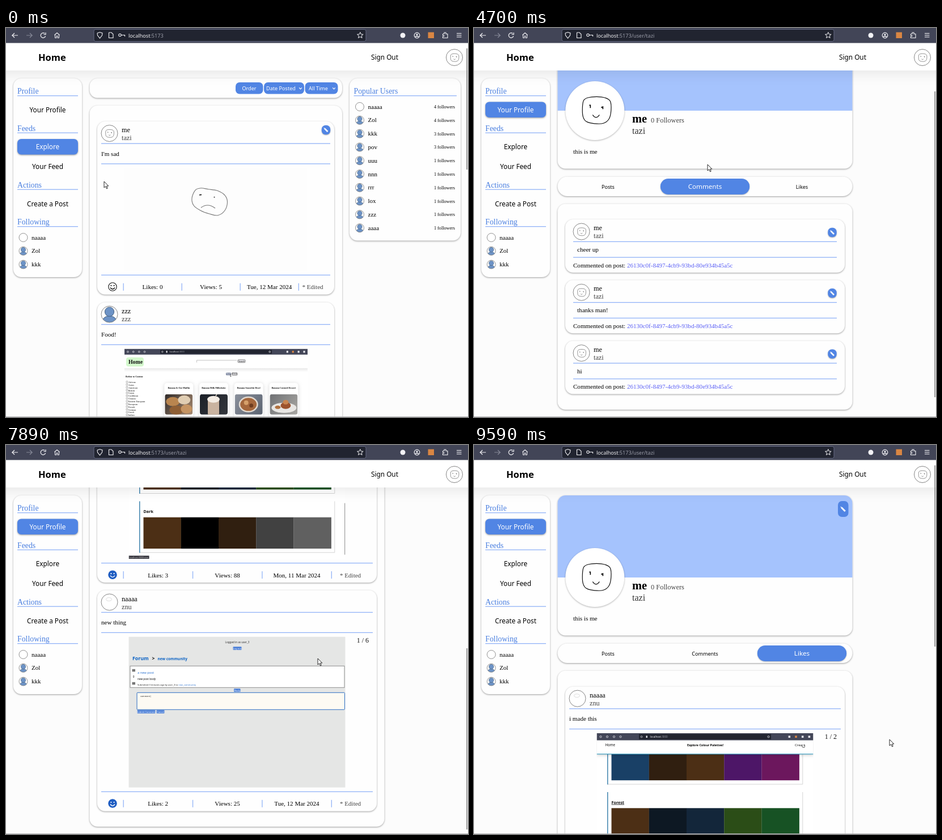
Recreate the animation shown at these times as an HTML page with a canvas. Size 815 px wide and 687 px high, loop 9.66 s.

```html
<!DOCTYPE html>
<html lang="en">
<head>
<meta charset="utf-8">
<title>Social feed walkthrough</title>
<style>
html, body { margin: 0; width: 100%; height: 100%; overflow: hidden; background: #fcfcfc; }
canvas { display: block; }
</style>
</head>
<body>
<canvas id="stage" width="815" height="687"></canvas>
<script>
const c = document.getElementById('stage').getContext('2d');
const LOOP = 9660, W = 815, H = 687;
const BLUE = '#5185e4', RULE = '#92b3f7', PAGE = '#fcfcfc';

// ---- timeline: [time, ...values], eased between stops
const POINTER = [[200, 173, 271], [1130, 97, 145], [2080, 97, 145], [2990, 350, 300], [3500, 412, 241],
  [4700, 412, 241], [5560, 584, 275], [5700, 584, 275], [6630, 551, 354], [7000, 551, 354],
  [7490, 550, 377], [8850, 550, 377], [9590, 733, 520]];
const SCROLL = [[2300, 0], [2900, 120], [4020, 120], [4370, 88], [6660, 88], [6960, 440], [7100, 440],
  [7480, 630], [8200, 630], [8550, 443], [8650, 443], [9130, 0]];
const CLIP_SCROLL = [[7000, 0], [7890, 331.6], [8020, 343.6]];
const CLIP_HAND = [[8600, 491, 185], [9500, 581, 22]];

function at(keys, t) {
  const i = keys.findIndex(k => k[0] > t);
  if (i === 0) return keys[0].slice(1);
  if (i < 0) return keys[keys.length - 1].slice(1);
  const a = keys[i - 1], b = keys[i], u = (t - a[0]) / (b[0] - a[0]), e = u * u * (3 - 2 * u);
  return a.slice(1).map((v, k) => v + (b[k + 1] - v) * e);
}

// ---- drawing helpers
const serif = (px, w = '') => `${w} ${px}px "Liberation Serif", "Times New Roman", serif`;
const sans = (px, w = '') => `${w} ${px}px "Noto Sans", "Open Sans", sans-serif`;

function text(s, x, y, font, color = '#111', align = 'left') {
  c.font = font; c.fillStyle = color; c.textAlign = align;
  c.fillText(s, x, y);
}
function rect(x, y, w, h, color) { c.fillStyle = color; c.fillRect(x, y, w, h); }
function round(x, y, w, h, r, fill, stroke) {
  c.beginPath(); c.roundRect(x, y, w, h, r);
  if (fill) { c.fillStyle = fill; c.fill(); }
  if (stroke) { c.strokeStyle = stroke; c.lineWidth = 1; c.stroke(); }
}
function oval(x, y, rx, ry, fill, stroke, lw = 1) {
  c.beginPath(); c.ellipse(x, y, rx, ry, 0, 0, 7);
  if (fill) { c.fillStyle = fill; c.fill(); }
  if (stroke) { c.strokeStyle = stroke; c.lineWidth = lw; c.stroke(); }
}
const disc = (x, y, r, fill, stroke, lw) => oval(x, y, r, r, fill, stroke, lw);
function line(pts, color, lw = 1, fill) {
  c.beginPath();
  for (let i = 0; i < pts.length; i += 2) c.lineTo(pts[i], pts[i + 1]);
  if (fill) { c.closePath(); c.fillStyle = fill; c.fill(); }
  c.strokeStyle = color; c.lineWidth = lw; c.stroke();
}
function curve(x0, y0, cx, cy, x1, y1, color, lw = 1) {
  c.beginPath(); c.moveTo(x0, y0); c.quadraticCurveTo(cx, cy, x1, y1);
  c.strokeStyle = color; c.lineWidth = lw; c.stroke();
}
function shadow(color, blur, dy, draw) {
  c.save(); c.shadowColor = color; c.shadowBlur = blur; c.shadowOffsetY = dy; draw(); c.restore();
}
function card(x, y, w, h, r = 14, fill = '#fefefe') {
  shadow('rgba(0,0,0,.38)', 3, 1, () => round(x, y, w, h, r, fill));
}
const rule = (x0, x1, y) => rect(x0, y - .6, x1 - x0, 1.3, RULE);
function clip(x, y, w, h, r, draw) {
  c.save(); c.beginPath(); c.roundRect(x, y, w, h, r); c.clip(); draw(); c.restore();
}
// closed smooth curve through every point
function blob(p, color, lw) {
  const n = p.length, v = i => p[(i + n) % n];
  c.beginPath(); c.moveTo(p[0], p[1]);
  for (let i = 0; i < n; i += 2) {
    const x1 = v(i) + (v(i + 2) - v(i - 2)) / 6, y1 = v(i + 1) + (v(i + 3) - v(i - 1)) / 6;
    const x2 = v(i + 2) - (v(i + 4) - v(i)) / 6, y2 = v(i + 3) - (v(i + 5) - v(i + 1)) / 6;
    c.bezierCurveTo(x1, y1, x2, y2, v(i + 2), v(i + 3));
  }
  c.strokeStyle = color; c.lineWidth = lw; c.stroke();
}
function scaled(x, y, k, draw) { c.save(); c.translate(x, y); c.scale(k, k); draw(); c.restore(); }

// ---- faces and avatars
function happy(x, y, k, color, lw) {
  scaled(x, y, k, () => {
    blob([-23, -17, -16, -22, 0, -24, 15, -22, 24, -16, 25.5, 0, 22, 15, 12, 23, -4, 23.5, -18, 20, -24, 11, -25, -4], color, lw);
    line([-13, -9, -11, -9, -11, -4], color, lw * 1.4);
    line([8, -5, 11, -6, 11, -2], color, lw * 1.5);
    curve(-7, 8, -1, 17, 5, 8, color, lw);
  });
}
function sad(x, y, k) {
  scaled(x, y, k, () => {
    const g = '#777';
    blob([-25, -21, -15, -24.5, -2, -22.5, 14, -20, 27, -12, 31.5, 0, 27, 15, 15, 23.5, 0, 21, -16, 15, -28, 6, -31, -7], g, 1.1);
    line([-18, -12.5, -14, -13], '#222', 1.7);
    disc(8.5, -8.5, 1, '#333');
    curve(-15, 10, -3, 1, 10, 11, g, 1.1);
  });
}
function avatar(kind, x, y, r) {
  const big = r > 10;
  disc(x, y, r, 'white');
  if (kind === 'face') happy(x + .5, y + .3, .29 * r / 14.5, '#666', 2.4);
  if (kind === 'user') {
    clip(x - r, y - r, 2 * r, 2 * r, r, () => {
      oval(x, y + r * .95, r * .9, r * .75, '#6d93c6', '#46607f', big ? 1 : .6);
      disc(x, y - r * .3, r * .56, '#6d93c6', '#46607f', big ? 1 : .6);
    });
  }
  if (kind === 'blank' && big) oval(x - 1, y - 5, 5, 3, null, '#dcdcdc');
  disc(x, y, r, null, '#777', big ? .9 : .8);
}
function pencil(x, y) {
  line([x - 2.6, y - 2.6, x + 3, y + 3], 'white', 2.6);
  line([x - 4, y - 4, x - 2, y - 2], 'white', 1);
}
function editDot(x, y) {
  shadow('rgba(0,0,0,.3)', 2, 1, () => round(x - 7.7, y - 8.2, 15.4, 16.4, 7, BLUE));
  pencil(x, y);
}

// ---- browser frame
function browser(url) {
  const ink = '#f2f2f5', dim = '#868998';
  rect(0, 0, W, 26.5, '#424557');
  round(155, 2.5, 480, 21, 3, '#212430', '#646981');
  line([21, 13, 11, 13, 15, 9], ink, 1.2); line([11, 13, 15, 17], ink, 1.2);
  line([36, 13, 46, 13, 42, 9], dim, 1.2); line([46, 13, 42, 17], dim, 1.2);
  c.beginPath(); c.arc(65.5, 13, 4.3, .3, 5.4); c.strokeStyle = ink; c.lineWidth = 1.2; c.stroke();
  line([70, 8, 70, 11.5, 66.5, 11.5], ink, 1.2);
  line([85.5, 12.5, 90, 8.5, 94.5, 12.5], ink, 1.2);
  line([86.5, 12, 86.5, 17.5, 89, 17.5, 89, 14, 91, 14, 91, 17.5, 93.5, 17.5, 93.5, 12], ink, 1);
  line([161, 9, 165.5, 7.5, 170, 9, 169.5, 13, 165.5, 18, 161.5, 13, 161, 9], ink, 1.1);
  line([181.5, 8, 186, 8, 189, 11, 189, 17.5, 181.5, 17.5, 181.5, 8], ink, 1.1);
  disc(201, 12.5, 2.2, null, ink, 1.1);
  line([203, 12.5, 209.5, 12.5, 209.5, 15], ink, 1.2);
  const star = [];
  for (let i = 0; i < 11; i++) {
    const a = -Math.PI / 2 + i * Math.PI / 5, r = i % 2 ? 2.5 : 5.6;
    star.push(624.8 + r * Math.cos(a), 13 + r * Math.sin(a));
  }
  line(star, ink, 1);
  text('localhost', 216, 16.5, sans(9.1), '#f4f4f6');
  text(url, 216 + c.measureText('localhost').width, 16.5, sans(9.1), '#9a9ca8');
  disc(700, 13, 4.5, ink);
  disc(725, 13, 4.8, null, ink, 1.2); disc(725, 11.5, 1.6, ink); curve(722, 15.6, 725, 13, 728, 15.6, ink, 1.6);
  rect(744.5, 7.5, 10.5, 10.5, '#d98643');
  line([770.5, 10.5, 773, 10.5, 773, 8, 776, 8, 776, 10.5, 779, 10.5, 779, 17.5, 770.5, 17.5, 770.5, 15, 773, 14, 770.5, 13, 770.5, 10.5], ink, 1.1);
  for (let i = 0; i < 3; i++) line([795, 9.5 + i * 3.2, 803.5, 9.5 + i * 3.2], ink, 1.1);
}
function header() {
  shadow('rgba(0,0,0,.09)', 24, 5, () => rect(-30, 26, W + 60, 49, 'white'));
  text('Home', 57, 58, sans(16.5, 'bold'), '#000');
  text('Sign Out', 644, 56, sans(11.8), '#000');
  avatar('face', 791, 52, 14.5);
}

// ---- sidebar and popular users
const PEOPLE = ['naaaa', 'Zol', 'kkk', 'pov', 'uuu', 'nnn', 'rrr', 'lox', 'zzz', 'aaaa'];
const COUNTS = [4, 4, 3, 3];
function heading(s, x, x1, y) {
  text(s, x, y, serif(13.8), '#4a7fe0');
  rule(x, x1, y + 3.6);
}
function person(i, x, y, tx) {
  avatar(i ? 'user' : 'blank', x, y, 7.5);
  text(PEOPLE[i], tx, y + 3.5, serif(11), '#000');
}
function sidebar(active, ptr) {
  card(13, 89, 121, 351);
  [['Profile', 116], ['Feeds', 181.5], ['Actions', 281.5], ['Following', 347]].forEach(h => heading(h[0], 20, 127, h[1]));
  [['Your Profile', 144.3], ['Explore', 209.8], ['Your Feed', 244.3], ['Create a Post', 310]].forEach(([s, y]) => {
    const hover = ptr[0] > 20 && ptr[0] < 127 && Math.abs(ptr[1] - y) < 14;
    const on = s === active || hover;
    if (on) shadow('rgba(0,0,0,.4)', 3, 1, () => round(20, y - 13.8, 107, 27.5, 7, BLUE));
    text(s, 73.5, y + 4.5, sans(11.75), on ? 'white' : '#000', 'center');
  });
  for (let i = 0; i < 3; i++) person(i, 30.5, 370 + i * 23.8, 45);
}
function popular() {
  card(606, 89, 196, 286.5);
  heading('Popular Users', 613.5, 795, 116);
  PEOPLE.forEach((p, i) => {
    const y = 139 + i * 23.8;
    person(i, 624, y, 638.5);
    text(`${COUNTS[i] || 1} followers`, 792, y + 3, serif(8.2), '#000', 'right');
  });
}

// ---- posts
function smile(x, y, on) {
  const ink = on ? 'white' : '#111';
  disc(x, y, 7.2, on ? '#1f5dc2' : null, on ? '#1f5dc2' : ink, 1.1);
  disc(x - 2.6, y - 2, 1.1, ink); disc(x + 2.6, y - 2, 1.1, ink);
  curve(x - 4, y + 1.5, x, y + 7, x + 4, y + 1.5, ink, 1.3);
}
function post(y, w, o) {
  const x = 168, r = x + w, foot = y + 74.8 + o.h;
  card(161, y, w + 14, foot + 34.5 - y);
  avatar(o.pic, 182.5, y + 21, 14.5);
  text(o.name, 204, y + 19, serif(12.2), '#000');
  text(o.handle, 204, y + 33, serif(12.2), '#444');
  if (o.edit) editDot(r - 7.5, y + 15);
  rule(x, r, y + 39);
  text(o.body, x, y + 60.5, serif(11.1), '#000');
  rule(x, r, y + 74.8);
  o.media(y + 82.3);
  if (o.page) text(o.page, r - 7, y + 92, serif(12), '#111', 'right');
  rule(x, r, foot);
  smile(188, foot + 20.7, o.liked);
  const col = w * .258 - 1.2;
  for (let i = 0; i < 4; i++) rect(206.5 + i * col, foot + 14.5, 1.3, 13, RULE);
  o.stats.forEach((s, i) => text(s, 207 + (i + .5) * col, foot + 25, serif(11.05), '#000', 'center'));
  text('* Edited', (207 + 3 * col + r) / 2 - 3, foot + 25, serif(11.05), '#444', 'center');
}
function sadPost(y, w) {
  const k = w / 404, mid = 168 + w / 2;
  post(y, w, {
    pic: 'face', name: 'me', handle: 'tazi', body: "I'm sad", edit: true, h: 196.5 * k,
    stats: ['Likes: 0', 'Views: 5', 'Tue, 12 Mar 2024'],
    media: top => {
      rect(mid - 161.5 * k, top, 323 * k, 182 * k, '#fdfdfd');
      sad(mid - 11 * k, top + 60 * k, k);
    }
  });
}

// ---- pictures inside posts
function miniBar(x, y, w, h) {
  const k = w / 382, my = y + h / 2, ink = '#e4e4ea';
  rect(x, y, w, h, '#434658');
  rect(x + w * .195, y + 1.5, w * .61, h - 3, '#212430');
  [7, 18.5, 30.5, 42].forEach(d => disc(x + d * k, my, 1.6 * k, null, ink, .8));
  disc(x + 79 * k, my, 1.5 * k, null, ink, .7);
  rect(x + 87 * k, my - 1.8, 2.4 * k, 3.6, ink);
  text('localhost', x + 94 * k, my + 1.6, sans(4.6 * k), ink);
  text(':3000', x + 94 * k + c.measureText('localhost').width, my + 1.6, sans(4.6 * k), '#9a9ca8');
  disc(x + 303 * k, my, 1.6 * k, null, ink, .8);
  for (let i = 0; i < 4; i++) rect(x + (338 + i * 11.7) * k, my - 1.8, 3.6 * k, 3.6, i === 1 ? '#d98643' : ink);
}
const CUISINES = 'African,Asian,American,British,Cajun,Caribbean,Chinese,Eastern European,European,French,German,Greek,Indian'.split(',');
const DISHES = ['Banana & Oat Muffin', 'Banana Milk Milkshake', 'Banana Smoothie Bowl', 'Banana Custard Dessert'];
const PHOTO = [['#2f2a29', '#a98c73'], ['#1b2028', '#33363c'], ['#8b919c', '#5b6371'], ['#6f7174', '#a9a7a3']];
function dish(i, x, y) {
  clip(x, y, 49, 36, 4, () => {
    const g = c.createLinearGradient(x, y, x + 49, y + 36);
    g.addColorStop(0, PHOTO[i][0]); g.addColorStop(1, PHOTO[i][1]);
    c.fillStyle = g; c.fillRect(x, y, 49, 36);
    if (i === 0) {
      oval(x + 14, y + 13, 12, 8, '#b9854f'); oval(x + 34, y + 10, 11, 8, '#e0cdb2');
      oval(x + 20, y + 28, 12, 8, '#8f5f35'); oval(x + 38, y + 26, 10, 8, '#c59463');
    } else if (i === 1) {
      round(x + 14, y + 9, 20, 28, 3, '#c9b3a0'); oval(x + 24, y + 9, 11, 6, '#f3ece4');
      line([x + 27, y + 5, x + 31, y - 2], '#d8cfc4', 1.5);
    } else if (i === 2) {
      oval(x + 24, y + 18, 17, 14, '#e2d9cf'); oval(x + 24, y + 18, 14.5, 11.5, '#a5673c');
      disc(x + 20, y + 15, 4, '#d6a06a'); disc(x + 29, y + 20, 3.5, '#6e3c20');
    } else {
      oval(x + 25, y + 24, 22, 9, '#e8e6e3');
      oval(x + 28, y + 20, 9, 6, '#9c532d'); oval(x + 14, y + 23, 5, 3, '#b0713f'); oval(x + 28, y + 14, 5, 4, '#c98650');
    }
  });
}
function recipes(y) {
  rect(209, y, 323, 130, 'white');
  miniBar(209, y, 323, 10);
  round(212, y + 15, 31, 16, 4, '#d3f8cc');
  text('Home', 216, y + 26, serif(9.8, 'bold'), '#111');
  line([336.5, y + 24, 336.5, y + 20, 407, y + 20], '#aaa', .7);
  round(409, y + 19, 13, 5, 1, '#e9e9ed', '#888');
  text('Search', 415.5, y + 23, sans(3.4), '#111', 'center');
  const g = c.createLinearGradient(0, y + 33, 0, y + 41);
  g.addColorStop(0, '#e6e6e6'); g.addColorStop(1, 'white');
  c.fillStyle = g; c.fillRect(209, y + 34, 323, 7);
  round(388, y + 42, 9, 4.5, 1, '#7c86a0'); round(398.5, y + 42, 9.5, 4.5, 1, '#e9e9ed', '#888');
  text('Food', 392.5, y + 45.6, sans(3.3), 'white', 'center');
  text('Drink', 403.2, y + 45.6, sans(3.3), '#111', 'center');
  line([396, y + 44, 396, y + 49, 397.5, y + 48], '#333', .8);
  text('Refine to Cuisine', 211, y + 50.5, serif(4.2, 'bold'), '#111');
  CUISINES.forEach((s, i) => {
    c.strokeStyle = '#777'; c.lineWidth = .5; c.strokeRect(212, y + 57 + i * 4.85, 2.8, 2.8);
    text(s, 215.8, y + 60.2 + i * 4.85, serif(4.2), '#111');
  });
  DISHES.forEach((s, i) => {
    const x = 279.3 + i * 61.7;
    shadow('rgba(0,0,0,.16)', 6, 1, () => round(x, y + 60, 51, 62, 5, 'white'));
    text(s, x + 25.5, y + 69.8, serif(4.1, 'bold'), '#111', 'center');
    dish(i, x + 1, y + 80);
  });
}
const PALETTES = [
  ['Pink', 'b32d84 4b1535 81235f b32d84 d34ba4'],
  ['znu', '163247 15313c 132244 1b1348 33164b'],
  ['Purple', '593685 1e1229 3f2757 5a3689 764bb5'],
  ['Mixed', '194066 301f10 4c2f15 4d1667 6c175d'],
  ['Forest', '4c2f15 0d1823 13263a 2b4d17 175224'],
  ['Dark', '4c2f15 000000 301f10 414141 606060']
];
function palettes(y, t) {
  const [p] = at(CLIP_SCROLL, t), [hx, hy] = at(CLIP_HAND, t);
  clip(216.5, y, 382, 322, 0, () => {
    rect(216, y, 383, 322, 'white');
    PALETTES.forEach(([name, colors], i) => {
      const ty = y + 48 + i * 104.4 - p;
      line([579.8, ty - 18, 579.8, ty + 72.5, 236, ty + 72.5], '#d3d3d3', 1);
      rect(235, ty - 18, 1.5, 91, '#3f83ad');
      text(name, 242.5, ty + 2.7, sans(7.2, 'bold'), '#111');
      if (i && i % 2 === 0) rect(242.5, ty + 3.6, c.measureText(name).width, .8, '#111');
      colors.split(' ').forEach((k, j) => rect(242.5 + j * 66.25, ty + 10.3, 66.4, 55.3, '#' + k));
    });
    text('End of list', 216.5, y + 48 + 522 - p + 92, sans(4.6), '#111');
    rect(597.2, y + 91 + p * .4, 1.2, 91, '#8b8b8b');
    rect(216.5, y + 316.5, 36, 6, '#33323a');
    text('localhost:3000/view', 217.5, y + 321, sans(3.6), '#d8d8d8');
    shadow('rgba(0,0,0,.25)', 6, 1, () => rect(216, y + 12, 383, 25, 'white'));
    rect(216.5, y + 36.2, 382, 1.2, '#3b9fc0');
    text('Home', 231.5, y + 23, sans(6.2), '#111');
    text('Explore Colour Palettes!', 408, y + 23, sans(5.4, 'bold'), '#000', 'center');
    text('Create', 584.5, y + 23, sans(6), '#111', 'right');
    miniBar(216.5, y, 382, 12.5);
    round(hx - 2, hy + y - 1, 4.5, 4, 1.5, 'white', '#444');
    line([hx - .5, hy + y - 3, hx - .5, hy + y + 1], 'white', 1.5);
  });
}
function tag(s, x, y, w) {
  round(x, y, w, 5.6, 1, '#4d80d8');
  text(s, x + w / 2, y + 4.3, sans(4), 'white', 'center');
}
function forum(y, t) {
  rect(216.5, y, 382, 266, '#e5e6e5');
  text('Logged in as user_3', 408, y + 11.3, sans(4.6), '#333', 'center');
  tag('Log out', 400.5, y + 17.5, 15);
  text('Forum', 223, y + 41.5, sans(8.8, 'bold'), '#0b62c4');
  text('>', 257.5, y + 41.5, sans(8.5, 'bold'), '#111');
  text('new community', 267.5, y + 41.5, sans(6.5, 'bold'), '#0b62c4');
  rect(219, y + 51.5, 378, 38, 'white');
  c.strokeStyle = '#8f8f8f'; c.lineWidth = 1; c.strokeRect(219, y + 51.5, 378, 38);
  rect(222.5, y + 57, 5.5, 4.5, '#777'); rect(222.5, y + 80, 5.5, 4.5, '#777');
  text('0', 225.2, y + 72.5, sans(4.8), '#111', 'center');
  text('a new post', 232, y + 64.7, sans(5.7), '#2f74d0');
  text('new post body', 232, y + 76, sans(4.7), '#111');
  const by = 'Submitted 3 minutes ago by user_3 to ';
  text(by, 232, y + 86.6, sans(4), '#222');
  text('new_community', 232 + c.measureText(by).width, y + 86.6, sans(4), '#2f74d0');
  tag('Reply', 402, y + 91.5, 11.5);
  round(231, y + 98.5, 366.5, 30, 1, '#fdfaf3', '#2f6fc4');
  const n = Math.max(0, Math.floor((t - 6820) / 140));
  text('comment,'.slice(0, n) + (n < 8 ? '|' : ''), 237, y + 106.5, sans(3.8), '#222');
  tag('Submit Comment', 231.5, y + 129.5, 32);
  tag('Cancel', 265.5, y + 129.5, 14);
}

// ---- pages
function chevron(x, y) { line([x - 2.3, y - 1.2, x, y + 1.3, x + 2.3, y - 1.2], 'white', 1.2); }
function explore() {
  card(147.5, 89, 445.5, 34.5);
  [[405, 48.5], [455, 71], [527.5, 58]].forEach(([x, w]) => round(x, 96, w, 20.5, 7, BLUE));
  text('Order', 429, 110, sans(9.1), 'white', 'center');
  text('Date Posted', 459, 110, sans(9.1), 'white');
  text('All Time', 534, 110, sans(9.1), 'white');
  chevron(519.5, 106.5); chevron(578.5, 106.5);
  card(147.5, 137, 445.5, 700);
  sadPost(165, 404);
  post(484.5, 404, {
    pic: 'user', name: 'zzz', handle: 'zzz', body: 'Food!', h: 260, media: recipes,
    stats: ['Likes: 1', 'Views: 9', 'Mon, 11 Mar 2024']
  });
  popular();
}
function comment(y, body) {
  card(161, y, 493, 94);
  avatar('face', 189.5, y + 21.5, 14.5);
  text('me', 211, y + 19, serif(12.2), '#000');
  text('tazi', 211, y + 33, serif(12.2), '#444');
  editDot(632, y + 23);
  rule(175, 640, y + 39.3);
  text(body, 182, y + 57, serif(11.1), '#000');
  rule(175, 640, y + 67);
  text('Commented on post:', 175, y + 84.5, serif(11.05), '#000');
  text('26130c0f-8497-4cb9-93bd-80e934b45a5c', 270, y + 84.5, serif(11.05), '#5a5ff5');
}
function profile(view, t, ptr, s) {
  card(147.5, 89, 520, 247.5);
  clip(147.5, 89, 520, 247.5, 14, () => rect(147, 89, 522, 145, '#a5c3fd'));
  round(642, 99, 18.5, 28, 7, BLUE);
  scaled(651.3, 113.5, 1.15, () => pencil(0, 0));
  shadow('rgba(0,0,0,.3)', 3, 1, () => disc(213.3, 234, 52, 'white'));
  happy(216.3, 233.3, 1, '#111', 1.2);
  text('me', 279, 255, serif(20.4, 'bold'), '#000');
  text('0 Followers', 312, 255, serif(12.4), '#444');
  text('tazi', 279, 274.5, serif(16), '#333');
  text('this is me', 175, 310, serif(11.1), '#000');

  card(147.5, 350.5, 520, 34.5, 17);
  ['Posts', 'Comments', 'Likes'].forEach((name, i) => {
    const x = 236.5 + i * 171, y = 368;
    const hover = Math.abs(ptr[0] - x) < 79 && Math.abs(ptr[1] + s - y) < 14;
    const on = name === view || hover;
    if (on) shadow('rgba(0,0,0,.25)', 2, 1, () => round(x - 78.7, 354, 157.4, 28, 14, BLUE));
    text(name, x, y + (on ? 4.3 : 3.5), sans(on ? 11.6 : 9.05), on ? 'white' : '#000', 'center');
  });

  const bottom = { Posts: 795, Comments: 762, Likes: 1304 }[view];
  card(147.5, 398.5, 520, bottom - 398.5);
  if (view === 'Posts') sadPost(426.7, 479);
  if (view === 'Comments') ['cheer up', 'thanks man!', 'hi'].forEach((b, i) => comment(426 + i * 107.3, b));
  if (view === 'Likes') {
    const base = { pic: 'blank', name: 'naaaa', handle: 'znu', liked: true };
    post(426.7, 479, { ...base, body: 'i made this', page: '1 / 2', h: 337, media: y => palettes(y, t),
      stats: ['Likes: 3', 'Views: 88', 'Mon, 11 Mar 2024'] });
    post(886.5, 479, { ...base, body: 'new thing', page: '1 / 6', h: 281, media: y => forum(y, t),
      stats: ['Likes: 2', 'Views: 25', 'Tue, 12 Mar 2024'] });
  }
}
function scrollbar(view, s) {
  let top = 36, len = 214;
  if (view === 'Likes') { top += s * 323 / 630; len = 320; }
  else if (view !== 'Explore') { top += s * 76 / 88; len = 540; }
  rect(812.3, top, 1.6, len, '#858585');
}
function pointer([x, y]) {
  line([x, y, x, y + 11, x + 2.6, y + 8.7, x + 4.5, y + 12.8, x + 6.2, y + 12, x + 4.4, y + 8.1, x + 7.8, y + 8, x, y], '#111', .9, 'white');
}

function draw(t) {
  const ptr = at(POINTER, t), [s] = at(SCROLL, t);
  const view = t < 1480 ? 'Explore' : t < 3600 ? 'Posts' : t < 5700 ? 'Comments' : 'Likes';
  rect(0, 0, W, H, PAGE);
  c.save();
  c.translate(0, -s);
  if (view === 'Explore') explore(); else profile(view, t, ptr, s);
  c.restore();
  sidebar(view === 'Explore' ? 'Explore' : 'Your Profile', ptr);
  header();
  browser(t < 1240 ? ':5173' : ':5173/user/tazi');
  scrollbar(view, s);
  rect(0, 686, W, 1, '#b9b9bb');
  pointer(ptr);
}

const start = performance.now();
function tick() {
  draw((performance.now() - start) % LOOP);
  requestAnimationFrame(tick);
}
tick();
</script>
</body>
</html>
```
